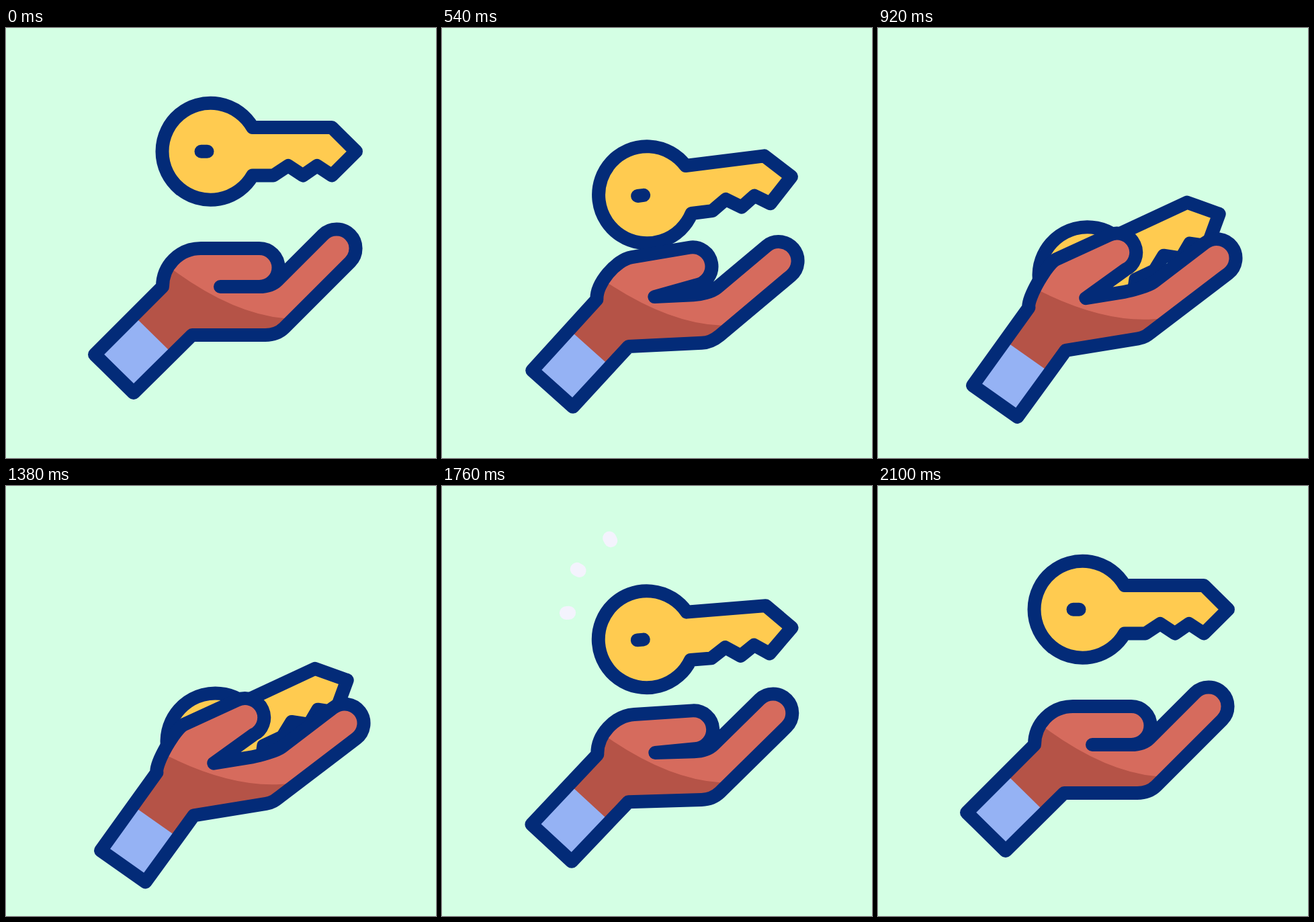
These frames come from a looping animation (640x640 px, 2.42 s). An HTML page:

```html
<!DOCTYPE html>
<html lang="en">
<head>
<meta charset="utf-8">
<title>Key and hand</title>
<style>
  html, body { margin: 0; width: 100%; height: 100%; overflow: hidden; background: #d4ffe4; }
  svg { display: block; width: 100%; height: 100%; }
  .line { fill: none; stroke: #032b78; stroke-width: 20; stroke-linejoin: round; stroke-linecap: round; }
  #sparks { fill: none; stroke: #f4f3fd; stroke-width: 20; stroke-linecap: round; }
</style>
</head>
<body>
<svg viewBox="0 0 640 640">
  <defs>
    <clipPath id="inside"><path class="shape"/></clipPath>
  </defs>
  <path id="sparks"/>
  <g id="key">
    <path class="line" style="fill:#ffcb50" d="M367 148H485L521 183.7 485 219.5 463 205 442 219.5 420 205 398 219.5H367A72 72 0 1 1 367 148Z"/>
    <path class="line" d="M290.5 183.7H299.5"/>
  </g>
  <g id="hand">
    <path class="shape" fill="#d66b5d"/>
    <g clip-path="url(#inside)">
      <path fill="#b55347" d="M228 345 250 361Q338 425 414 432L432 434V500H150V385Z"/>
      <path fill="#95b2f4" d="M132 486 190 428 248 485 190 543Z"/>
    </g>
    <path class="shape line"/>
  </g>
</svg>
<script>
const LOOP = 2420;
const $ = id => document.getElementById(id);
const shapes = document.querySelectorAll('.shape');

const part = (t, from, to) => Math.min(1, Math.max(0, (t - from) / (to - from)));
const smooth = u => u * u * (3 - 2 * u);
const drop = u => smooth(u ** 2.8);
const toss = u => 1 - (1 - u ** 1.1) ** 4.5;

// Returns a function that turns a point clockwise about (cx, cy)
function turner(cx, cy, deg) {
  const a = deg * Math.PI / 180, c = Math.cos(a), s = Math.sin(a);
  return (x, y) => {
    const dx = x - cx, dy = y - cy;
    return `${(cx + dx * c - dy * s).toFixed(2)} ${(cy + dx * s + dy * c).toFixed(2)} `;
  };
}

function handPath(bend) {
  const F = turner(407, 439, 17 * bend), T = turner(261, 344, -15.4 * bend);
  const tip = 'A28.5 28.5 0 0 0 ', tuck = 17 * bend;
  return 'M132 486L190 543L277 457L386 457C397 457 ' + F(406.5, 453.7) + F(414, 446.4) +
    'L' + F(512.2, 348.2) + tip + F(471.8, 307.8) +
    'L' + F(404, 375.6) + 'C' + F(397, 382.6) + '387 385 377 385L319 385' +
    'L' + T(377, 385) + tip + T(377, 328) +
    'L' + T(290, 328) + 'C' + T(258.5 + tuck, 328) + `233 ${353.5 + tuck} 233 385Z`;
}

function sparkPath(t) {
  const tail = 115.5 + 49.5 * smooth(part(t, 1840, 2080));
  const grow = part(t, 1750, 2000);
  const head = 115.5 + 49.5 * grow * (2 - grow);
  if (head <= tail) return '';
  return [117.5, 150, 182.5].map(deg => {
    const p = turner(304.5, 183.7, -deg);
    return 'M' + p(304.5 + tail, 183.7) + 'L' + p(304.5 + head, 183.7);
  }).join('');
}

function draw(t) {
  const grip = drop(part(t, 210, 690)) - toss(part(t, 1580, 2100));
  const bend = drop(part(t, 210, 645)) - toss(part(t, 1533, 2100));
  const sink = 1 - smooth(part(t, 690, 920));
  const pull = smooth(part(t, 1220, 1580) ** 1.5);
  const keyY = grip * (184.5 + 41 * sink + 57 * pull);
  const handY = grip * (22.7 + 36 * sink + 48.8 * pull);

  $('key').setAttribute('transform',
    `translate(${7 * grip * grip} ${keyY}) rotate(${-25 * grip} 304.5 183.7)`);
  $('hand').setAttribute('transform',
    `translate(0 ${handY}) rotate(${-9.3 * grip} 280 442)`);
  const d = handPath(bend);
  shapes.forEach(s => s.setAttribute('d', d));
  $('sparks').setAttribute('d', sparkPath(t));
}

const start = performance.now();
function tick() {
  draw((performance.now() - start) % LOOP);
  requestAnimationFrame(tick);
}
tick();
</script>
</body>
</html>
```
